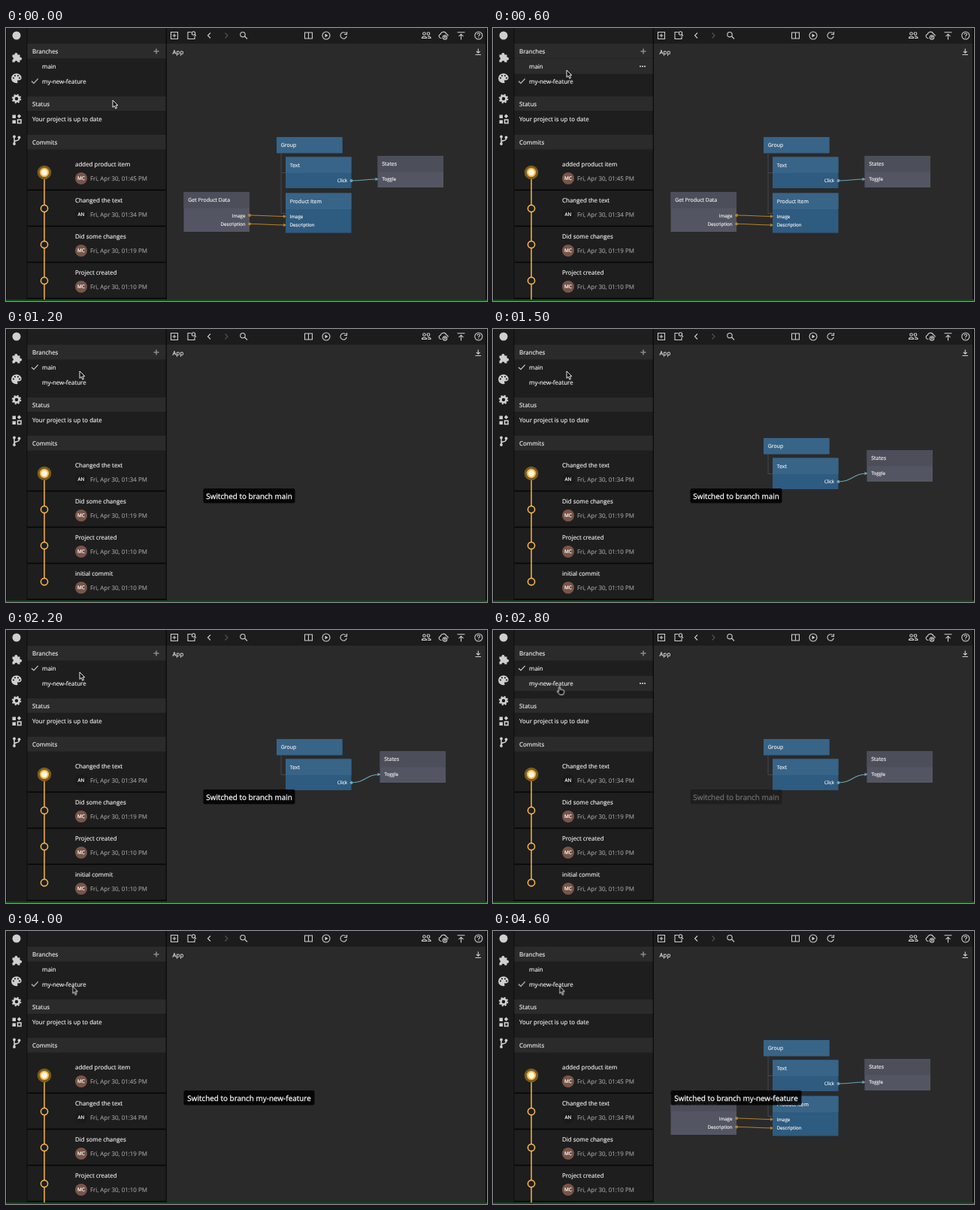
An HTML page that plays this animation: 640 px wide and 363 px high, repeating every 4.7 s.

```html
<!DOCTYPE html>
<html lang="en">
<head>
<meta charset="utf-8">
<title>Switching branches</title>
<style>
html, body { margin: 0; width: 100%; height: 100%; overflow: hidden; background: #111; }
svg { display: block; width: 640px; height: 363px; }
text {
  font: 7.95px "Open Sans", "Noto Sans", sans-serif; text-rendering: geometricPrecision;
  fill: #ededed; stroke: #ededed; stroke-width: .18;
}
.line { fill: none; stroke: #cfcfcf; stroke-width: 1.1; }
.line .dim { stroke: #555; }
.solid { fill: #cfcfcf; }
.bar { fill: #2b2b2b; }
.date { fill: #a2a2a2; stroke: #a2a2a2; stroke-width: .12; }
.initials { font-size: 6.4px; text-anchor: middle; fill: #fff; stroke: #fff; stroke-width: .2; }
.head { font-size: 7px; }
.port { font-size: 6.2px; }
.right { text-anchor: end; }
.toast text { font-size: 9.93px; fill: #fff; stroke: #fff; stroke-width: .25; text-anchor: middle; }
.toast rect { fill: #000; fill-opacity: .86; }
.wire { fill: none; stroke-width: 1.2; }

/* one shared clock of 4.7 s */
.cut { animation: 4.7s step-end infinite; }
.on-main { animation-name: on-main; }
.on-feature { animation-name: on-feature; }
.log-main { animation-name: log-main; }
.log-feature { animation-name: log-feature; }
.nodes-main { animation-name: nodes-main; }
.nodes-feature { animation-name: nodes-feature; }
.halo { animation-name: halo; }
.hover-main { animation-name: hover-main; }
.hover-feature { animation-name: hover-feature; }
.arrow { animation-name: arrow; }
.hand { animation-name: hand; }
.toast-main { animation: toast-main 4.7s linear infinite; }
.toast-feature { animation: toast-feature 4.7s linear infinite; }
.cursor { animation: cursor 4.7s ease-in-out infinite; }

@keyframes on-main { 0%, 72.13% { opacity: 0 } 16.81% { opacity: 1 } }
@keyframes on-feature { 0%, 72.13% { opacity: 1 } 16.81% { opacity: 0 } }
@keyframes log-main { 0%, 78.51% { opacity: 0 } 23.19% { opacity: 1 } }
@keyframes log-feature { 0%, 78.51% { opacity: 1 } 23.19% { opacity: 0 } }
@keyframes nodes-main { 0%, 72.13% { opacity: 0 } 31.7% { opacity: 1 } }
@keyframes nodes-feature { 0%, 89.15% { opacity: 1 } 16.81% { opacity: 0 } }
@keyframes halo { 0%, 23.19%, 78.51% { opacity: 1 } 16.81%, 72.13% { opacity: 0 } }
@keyframes hover-main { 0%, 16.81% { opacity: 0 } 9.79% { opacity: 1 } }
@keyframes hover-feature { 0%, 9.79%, 72.13% { opacity: 0 } 6.17%, 52.13% { opacity: 1 } }
@keyframes arrow { 0%, 72.13% { opacity: 1 } 52.13% { opacity: 0 } }
@keyframes hand { 0%, 72.13% { opacity: 0 } 52.13% { opacity: 1 } }
@keyframes toast-main {
  0%, 21.5% { opacity: 0 } 24.5%, 53.2% { opacity: 1 } 59.57% { opacity: .32 } 63.8%, 100% { opacity: 0 }
}
@keyframes toast-feature { 0%, 76.6% { opacity: 0 } 79.8%, 100% { opacity: 1 } }
@keyframes cursor {
  0%, 1.1% { transform: translate(142px, 96px) }
  12.6%, 47.9% { transform: translate(98px, 56px) }
  56.4%, 100% { transform: translate(88.5px, 73.5px) }
}
</style>
</head>
<body>
<svg viewBox="0 0 640 363">
  <defs>
    <g id="dots" class="solid"><circle cx="196" r="1.1"/><circle cx="199" r="1.1"/><circle cx="202" r="1.1"/></g>
    <path id="check" class="line" d="M34 0l3 2.7 5.700-6"/>
  </defs>

  <!-- surfaces -->
  <rect width="640" height="363" fill="#0c0c0c"/>
  <rect x="1" width="26.5" height="361" fill="#1b1b1b"/>
  <rect x="28.5" width="184" height="361" fill="#1e1e1e"/>
  <rect x="214" width="424" height="20.5" fill="#1c1c1c"/>
  <rect x="214" y="20.5" width="424" height="340.5" fill="#2a2a2a"/>

  <!-- tool strip -->
  <circle cx="14" cy="10" r="5.5" class="solid"/>
  <g class="solid">
    <path d="M8.5 35.5h3a2 2 0 1 1 3.8 0h3.2v3.400a2 2 0 1 1 0 3.800v2.800h-3a2 2 0 0 0-4 0h-3v-3.200a2 2 0 0 0 0-3.800z"/>
    <path d="M14 60.500a6.400 6.400 0 1 0 .4 12.700c1.300 0 1.600-1.300.8-2.100-.6-1 0-1.700 1-1.700h1.400c1.800 0 3-1.300 3-3.100 0-3.300-3.100-5.800-6.600-5.800z"/>
    <path d="M8.500 115.500h4.500v4.500h-4.500zM8.500 122.500h4.500v4.500h-4.500zM17.500 114.500l2.700 2.700-2.700 2.700-2.700-2.700z"/>
    <circle cx="11" cy="144.500" r="1.900"/><circle cx="11" cy="154" r="1.900"/><circle cx="17.500" cy="145.500" r="1.900"/>
  </g>
  <rect x="15.500" y="122" width="4.500" height="4.500" class="line" style="stroke-width:1.600"/>
  <g fill="#1b1b1b">
    <circle cx="10" cy="66.500" r="1.100"/><circle cx="12" cy="63.500" r="1.100"/><circle cx="16" cy="63.500" r="1.100"/><circle cx="18" cy="66.500" r="1.100"/>
  </g>
  <circle cx="14" cy="94" r="3.600" class="line" style="stroke-width:2.800"/>
  <circle cx="14" cy="94" r="5.400" class="line" style="stroke-width:1.800;stroke-dasharray:2.120 2.120"/>
  <path class="line" style="stroke-width:1.500" d="M11 144v10M17.500 145v1.500q0 3-3.500 3.200-3 .2-3 3"/>

  <!-- top bar -->
  <g class="line">
    <path d="M219.500 5.500h9v9h-9zM224 7.500v5M221.500 10h5"/>
    <path d="M246.500 5.500h-4.500v9h9v-4"/><circle cx="249.500" cy="7" r="2.200"/><path d="M251 8.500l2 2"/>
    <path d="M272 6.500l-3.500 3.500 3.500 3.500"/>
    <path class="dim" d="M291.500 6.500l3.500 3.500-3.500 3.500"/>
    <circle cx="315" cy="8.700" r="3.200"/><path d="M317.500 11l3.500 3.500"/>
    <path d="M397.500 6h10v8h-10zM402.500 6v8"/>
    <circle cx="426" cy="10" r="5"/>
    <path d="M452.300 7.200a4.200 4.200 0 1 0 1 3.500M453.500 5v3.500h-3.500"/>
    <circle cx="556.500" cy="7.500" r="1.800"/><circle cx="562" cy="7.500" r="1.800"/>
    <path d="M553.500 13.500v-1q3-2.500 6 0v1zM561 11.300q3-.6 4 1.200v1h-4"/>
    <path d="M579.500 13.500h-1a2.700 2.700 0 0 1-.3-5.300 4 4 0 0 1 7.600-.5 3 3 0 0 1 2.400 3"/>
    <circle cx="584" cy="12.500" r="2.700"/><path d="M584 14v-3M582.800 12.200l1.200-1.200 1.200 1.200"/>
    <path d="M600.500 5.800h10M605.500 15.500v-7M602.500 11.200l3-3 3 3"/>
    <circle cx="628.800" cy="10" r="5"/>
    <path d="M627 8.700q0-1.700 1.800-1.700t1.800 1.500q0 1-1.800 2v.8M628.800 12.200v1.100"/>
    <path d="M628.300 27.500v5.500M626 31l2.300 2.300 2.300-2.300M624.500 35.500h7.500"/>
  </g>
  <path class="solid" d="M424.500 7.500l4 2.500-4 2.500z"/>
  <text x="221.500" y="34.700">App</text>

  <!-- branch panel -->
  <g class="bar">
    <rect x="28.500" y="21" width="184" height="19.500"/>
    <rect x="28.500" y="91" width="184" height="19"/>
    <rect x="28.500" y="142" width="184" height="19.500"/>
  </g>
  <path d="M200 27.500v7M196.500 31h7" stroke="#8d8d8d" stroke-width="1.500"/>
  <g class="cut hover-main"><rect class="bar" x="28.500" y="41" width="184" height="20"/><use href="#dots" y="51"/></g>
  <g class="cut hover-feature"><rect class="bar" x="28.500" y="61" width="184" height="20"/><use href="#dots" y="71"/></g>
  <text x="35" y="34">Branches</text>
  <text x="48" y="53.700">main</text>
  <text x="48" y="73.700">my-new-feature</text>
  <text x="35" y="103.500">Status</text>
  <text x="35" y="123.700">Your project is up to date</text>
  <text x="35" y="154.500">Commits</text>
  <use href="#check" y="51" class="cut on-main"/>
  <use href="#check" y="70.700" class="cut on-feature"/>

  <g id="log-feature" class="cut log-feature"></g>
  <g id="log-main" class="cut log-main"></g>
  <g id="nodes-feature" class="cut nodes-feature"></g>
  <g id="nodes-main" class="cut nodes-main"></g>

  <g class="toast toast-main">
    <rect x="262.500" y="212" width="122" height="19.500" rx="2"/>
    <text x="323.500" y="225.500">Switched to branch main</text>
  </g>
  <g class="toast toast-feature">
    <rect x="236.500" y="212" width="174" height="19.500" rx="2"/>
    <text x="323.500" y="225.500">Switched to branch my-new-feature</text>
  </g>

  <rect y="361" width="640" height="2" fill="#0b4d13"/>

  <g class="cursor" fill="#111" stroke="#fff" stroke-width=".9" stroke-linejoin="round">
    <path class="cut arrow" d="M0 0v9.500l2.200-2 1.600 3.700 1.700-.8-1.600-3.500h3z"/>
    <path class="cut hand" d="M-1 2.500q1-1.500 2 0v3.300q1-.8 1.800.2 1-.6 1.700.4 1.500-.4 1.600 1v2.100l-1.200 3h-4.500l-3.400-3.800q-.3-1.300 1-1l1 .8z"/>
  </g>
</svg>

<script>
const commits = [
  ["added product item", "MC", "01:45"],
  ["Changed the text", "AN", "01:34"],
  ["Did some changes", "MC", "01:19"],
  ["Project created", "MC", "01:10"],
  ["initial commit", "MC", "01:10"],
];
const gold = "#f6b44c";
const blue = ["#386488", "#2e5b80"], gray = ["#4c4f5a", "#535662"];
const rowY = i => 192 + i * 48;
const put = (id, markup) => { document.getElementById(id).innerHTML = markup; };

function commitRow([title, who, time], i) {
  const y = rowY(i);
  return `<circle cx="51" cy="${y}" r="4.6" fill="#1e1e1e" stroke="${gold}" stroke-width="1.6"/>
    <circle cx="100" cy="${y + 8}" r="8" fill="${who === "MC" ? "#795548" : "#1a1a1a"}"/>
    <text class="initials" x="100" y="${y + 10.2}">${who}</text>
    <text x="92" y="${y - 7.7}">${title}</text>
    <text class="date" x="112" y="${y + 10.6}">Fri, Apr 30, ${time} PM</text>`;
}

function log(list, bottom) {
  const rules = list.map((_, i) => `M28.5 ${rowY(i) + 23.5}h184`).join("");
  return `<path d="${rules}" stroke="#050505" stroke-width="1.3"/>
    <path d="M51 192V${bottom}" stroke="${gold}" stroke-width="1.5"/>
    ${list.map(commitRow).join("")}
    <g class="cut halo"><circle cx="51" cy="192" r="9.3" fill="#765d20"/>
    <circle cx="51" cy="192" r="5.2" fill="#fff6dc" stroke="${gold}" stroke-width="2"/></g>`;
}

function node(x, y, h, [head, body], title) {
  return `<rect x="${x}" y="${y}" width="87.5" height="${h}" fill="${body}"/>
    <rect x="${x}" y="${y}" width="87.5" height="21.5" fill="${head}"/>
    <text class="head" x="${x + 5.7}" y="${y + 13}">${title}</text>`;
}

const port = (x, y, label, side = "") => `<text class="port ${side}" x="${x}" y="${y}">${label}</text>`;

function wire(x1, y1, x2, y2, color) {
  const mid = (x1 + x2) / 2;
  return `<path class="wire" stroke="${color}" d="M${x1} ${y1}C${mid} ${y1} ${mid} ${y2} ${x2} ${y2}"/>
    <circle cx="${x1}" cy="${y1}" r="2" fill="${color}"/>
    <path fill="${color}" d="M${x2 + 1} ${y2}l-4-2.2v4.4z"/>`;
}

const tree = d => `<path d="${d}" fill="none" stroke="#505050" stroke-width=".8"/>`;

const shared = node(360, 145, 21, blue, "Group") +
  node(372, 171.5, 41.5, blue, "Text") + port(454, 205, "Click", "right");

const states = (x, y) => node(x, y, 42, gray, "States") + port(x + 6, y + 33, "Toggle") +
  wire(459.5, 203, x, y + 31, "#69a7b7");

put("log-feature", log(commits.slice(0, 4), 361));
put("log-main", log(commits.slice(1), 336));
put("nodes-main", tree("M366 166v26.5h6") + shared + states(497.5, 161));
put("nodes-feature", tree("M366 166v80.5h6M366 192.5h6") + shared + states(494.5, 170) +
  node(372, 219.5, 53, blue, "Product Item") +
  port(377.5, 253, "Image") + port(377.5, 264, "Description") +
  node(236.5, 218, 53, gray, "Get Product Data") +
  port(318.5, 251.5, "Image", "right") + port(318.5, 262.5, "Description", "right") +
  wire(324, 249, 372, 250.5, "#b5822f") + wire(324, 260.5, 372, 262, "#b5822f"));
</script>
</body>
</html>
```
